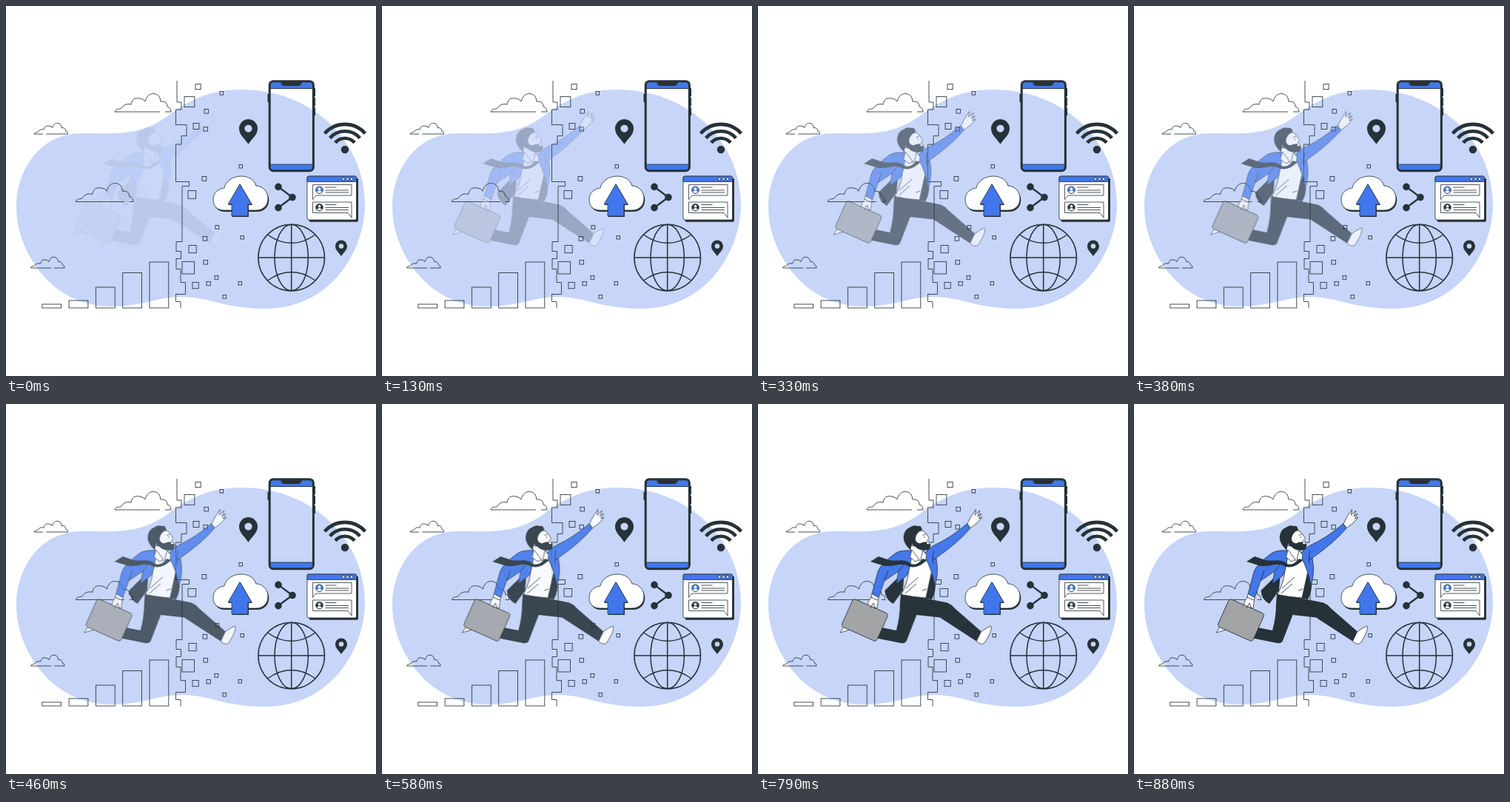
These frames come from a looping animation (500x500 px, 930 ms). An HTML page:

```html
<!DOCTYPE html>
<html lang="en">
<head>
<meta charset="utf-8">
<title>Leap into digital</title>
<style>
  html, body { margin: 0; width: 100%; height: 100%; overflow: hidden; background: #fff; }
  svg { display: block; width: 100vw; height: 100vh; }
  .line { fill: none; stroke: #263238; stroke-width: .85; }
  .line path { vector-effect: non-scaling-stroke; }
  .ink { fill: #263238; }
  .blue { fill: #4277eb; }
  .white { fill: #fff; }
  .sky { fill: #c6d5f8; }
  .grey { fill: #a2a3a5; }
  .edge { stroke: #263238; stroke-width: .8; stroke-linejoin: round; }
  .bold { fill: none; stroke: #263238; }
</style>
</head>
<body>
<svg viewBox="0 0 500 500">
  <path class="sky" d="M14 272C14 222 46 172 102 172C150 172 180 176 218 149C252 123 282 113 318 113C415 113 485 184 485 268C485 330 440 409 350 409C295 409 275 393 237 393C205 393 185 406 142 406C60 406 14 330 14 272Z"/>

  <g id="scene"></g>

  <!-- phone -->
  <g>
    <path class="blue" d="M357 103H414V112H357ZM357 214H414V222H357Z"/>
    <path class="line" d="M357 111.5H414M357 214H414"/>
    <path class="ink" d="M371 102H400Q399 108 395 108H376Q372 108 371 102Z"/>
    <rect class="bold" x="356.2" y="101.7" width="59.2" height="121" rx="5" stroke-width="3"/>
    <path class="bold" stroke-width="2" d="M354.5 119v11M417 111v11m0 2v11m0 2v11"/>
  </g>

  <!-- cloud upload -->
  <defs>
    <path id="puff" d="M295 276C285 276 280 270 280 262C280 252 287 247 295 246C297 236 307 230 318 230C329 230 336 236 338 243C347 243 354 251 354 260C354 270 347 276 338 276Z"/>
    <path id="arrow" d="M316 240.5L332 268H327V284H305V268H300Z"/>
  </defs>
  <use href="#puff" class="ink" x="1.3" y="2"/>
  <use href="#puff" class="white edge"/>
  <use href="#arrow" class="ink" x="1" y="1"/>
  <use href="#arrow" class="blue edge"/>

  <!-- chat window -->
  <rect class="ink" x="409.5" y="232.5" width="66.5" height="59.3" rx="2"/>
  <rect class="white edge" x="407" y="230" width="66.5" height="59" rx="2"/>
  <path class="blue edge" d="M407 237.5V232Q407 230 409 230H471.5Q473.5 230 473.5 232V237.5Z"/>
  <path class="white edge" d="M414.5 241.5H467V256H419L414.5 261.5ZM414.5 265H467V286L462 279.5H414.5Z"/>
  <g id="chat"></g>

  <!-- globe -->
  <g class="bold" stroke-width="1.5">
    <circle cx="385.7" cy="340" r="44.8"/>
    <ellipse cx="385.7" cy="340" rx="22.7" ry="44.8"/>
    <path d="M385.7 295v90M341 340h90M353.5 309Q385.7 332 418 309M353.5 371Q385.7 348 418 371"/>
  </g>

  <g id="runner">
    <!-- shoes and trousers -->
    <path class="white edge" d="M119 297L111 309L128 304Z"/>
    <path class="ink" d="M193 256L256 268.5Q262 271 266 276L302 307.5L296 321L246 288.5L214.5 285L201 320Q199 324 193 323L158 316L167 302L187 306Q192 288 192 270Z"/>
    <path class="white edge" d="M301.5 308Q309 302 315 300C317 304 312 314 306.500 322.5Q302 327 295.5 320.5Z"/>

    <!-- jacket lining and shirt -->
    <path class="ink" d="M198 226L171.5 252Q172 264 183 270L196 252ZM229 212L240 238Q241 254 235 264L222 262Z"/>
    <path class="white edge" d="M208 197L226 205L235 226L227 262Q210 261 194 257.5Q204 238 204 222Z"/>
    <path class="line" d="M217 234L200 249M214 243L199 256M228 250L222 252"/>

    <!-- jacket and raised arm -->
    <path class="blue edge" d="M208 198Q192 197 185.5 202Q165 217 162 227L154 257L163 262L171 239L190 226L187 243L201 232Q207 222 208 198Z"/>
    <path class="line" d="M190 226Q196 220 199 212M176 225L171 239"/>
    <path class="blue edge" d="M226 201Q233 193 240 190Q260 181 283 161.5L287 168Q270 188 241 208Q245 228 239 246Q236 226 226 207Z"/>
    <path class="line" d="M241 208L236 211M238 198Q235 207 237 216"/>
    <path class="white edge" d="M283 162L287 154L294.5 142.5L293.5 150L300 144L297 152L302 148L298.500 155L303 153L296 161L287.5 167.5Z"/>

    <!-- head -->
    <path class="white edge" d="M206 191L207 201L219 212L226 205L223 194Z"/>
    <path class="white edge" d="M208 187L212 176Q215 171 223 171L227 175L231.5 181.5L229 184L232 188L230 196L216 195Z"/>
    <path class="ink" d="M206 197C199 191 196 184 197 178Q198 170 205 167Q210 163 216 165Q221 164 222 170C215 174 213 178 213 184C216 189 219 189 222 187L229 186L228 189L233.5 189.5Q233 198 228 197.5Q218 199 212 192Q208 192 209 187Z"/>
    <path class="line" d="M222.5 177.500L226.5 176M225 179V181"/>

    <!-- collar and tie -->
    <path class="white edge" d="M208 197L205.5 207L213 213L218 210ZM223 198L220 210L226.5 213L228 204Z"/>
    <path class="ink" d="M223 209Q215 219 207 216C198 208 188 213 178 211L163 206L152 213L170 218.5C184 221 193 213 203 219Q216 224 228 211Z"/>

    <!-- hand and briefcase -->
    <path class="white edge" d="M154 256.5L163 261.5L161 276L148 273.5Q149 265 153 262Z"/>
    <rect class="grey edge" x="-26" y="-20.5" width="52" height="41" rx="4" transform="translate(144.5 292) rotate(24)"/>
    <path class="line" d="M152 276L156 269L159 277M152.5 261L162 265"/>
  </g>
</svg>
<script>
  const add = (id, markup) => document.getElementById(id).insertAdjacentHTML('beforeend', markup);
  const box = (x, y, w, h = w) => add('scene', `<rect class="line" x="${x}" y="${y}" width="${w}" height="${h}"/>`);
  const dot = (id, x, y, r, look) => add(id, `<circle class="${look}" cx="${x}" cy="${y}" r="${r}"/>`);

  // outline cloud: left end, baseline, scale, gap position along the base
  const cloud = (x, y, s, gap) => add('scene', `<g class="line"><path transform="translate(${x} ${y}) scale(${s})"
    d="M0 0C2-5 6-3 9-5Q13-12 22-10C23-16 27-20 34-18Q40-17 41-14C43-22 48-25 53-24.5Q61-24 62-14Q71-15 71-7Q76-6 76 0M0 0H${gap}M${gap + 7} 0H76"/></g>`);
  cloud(147, 143, 1, 61);
  cloud(38, 173, .6, 20);
  cloud(94.3, 264.5, 1.02, 64);
  cloud(33.5, 354, .6, 46);

  // bar chart
  [5, 10, 28, 47.5, 62].forEach((h, i) => box(48.8 + 36.3 * i, 408 - h, 25.8, h));

  // broken edge
  add('scene', `<path class="line" d="M231 101v29h6v10h-7.500v20.500H244v15h-7V187h-7.500v50.500h18v6H238v75h-8v13h6.500v10H230v14h6v18h6.500v16h-13v10H236v9"/>`);

  // loose pixels shrink as they drift away from the edge
  const drift = [[256, 105], [289, 115], [241, 122], [268, 139], [253, 158], [267, 163], [315, 214], [265, 230], [246, 249], [283, 296],
    [266, 311], [317, 310], [247, 323], [267, 343], [238, 345], [282, 364], [271, 372], [252, 373], [314, 372], [293, 390]];
  drift.forEach(([x, y]) => box(x, y + .5, 4.5 + 12 * Math.exp((238 - x) / 12)));

  // map pins
  const pin = (x, y, r) => {
    add('scene', `<path class="ink" transform="translate(${x} ${y}) scale(${r})" d="M0 1.7C-.45 1-1 .7-1 0a1 1 0 0 1 2 0C1 .7 .45 1 0 1.700Z"/>`);
    dot('scene', x, y, r * .41, 'sky');
  };
  pin(327.5, 165.5, 12.5);
  pin(453, 324.5, 8);

  // wifi
  dot('scene', 458, 194, 5.2, 'ink');
  [17.5, 27, 36.5].forEach(r => {
    const dx = r * .75, y = 196 - r * .65;
    add('scene', `<path class="bold" stroke-width="4.6" d="M${458 - dx} ${y}A${r} ${r} 0 0 1 ${458 + dx} ${y}"/>`);
  });

  // share
  add('scene', '<path class="bold" stroke-width="2.3" d="M368 244.3L387 258.5L368 272.5"/>');
  [-1, 0, 1].forEach(k => dot('scene', k ? 368 : 387, 258.5 + 14.1 * k, 4.8, 'ink'));

  // chat window details
  [0, 1, 2].forEach(i => dot('chat', 456 + 5.5 * i, 233.8, 1.8, 'white edge'));
  ['blue', 'ink'].forEach((look, i) => {
    const y = 248.7 + 23.5 * i;
    dot('chat', 423.5, y, 4.8, look + ' edge');
    dot('chat', 423.5, y - 1.5, 1.9, 'white');
    add('chat', `<path class="white" d="M420 ${y + 2.8}q3.5-4 7 0q-3.500 2.500-7 0Z"/>
      <path class="line" d="M431.5 ${y - 3.7}h15m-15 4h31.500m-31.500 3h31.500"/>`);
  });

  // slide in from the left with a fade, held at 24 poses per second
  const LOOP = 930, POSES = 22, REACH = 22;
  const frames = Array.from({ length: POSES }, (_, i) => {
    const p = Math.sin(Math.PI / 2 * (i + 1) / POSES);
    return {
      offset: Math.round(i * 100 / 24) * 10 / LOOP,
      opacity: p,
      transform: `translateX(${REACH * (p - 1)}px)`,
      easing: 'steps(1, end)'
    };
  });
  frames.push({ offset: 1, opacity: 1, transform: 'translateX(0px)' });
  document.getElementById('runner').animate(frames, { duration: LOOP, iterations: Infinity });
</script>
</body>
</html>
```
